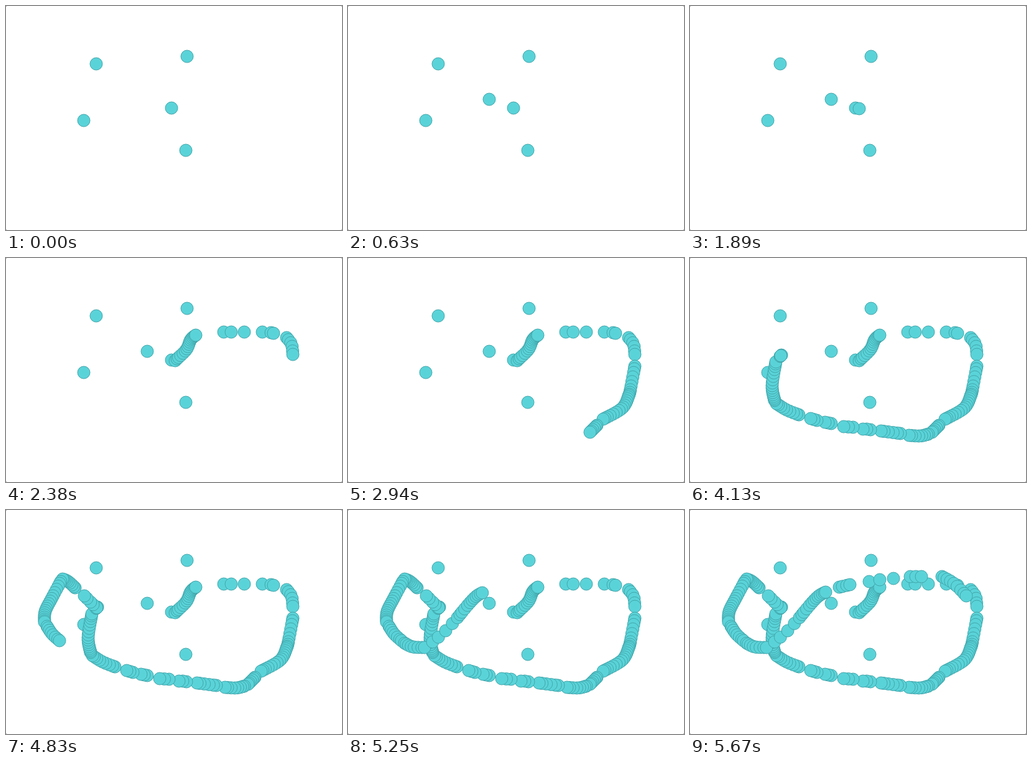
Recreate the animation shown at these times as an HTML page with a canvas. Size 540x360 px, loop 6580 ms.

```html
<!DOCTYPE html>
<html lang="en">
<head>
<meta charset="utf-8">
<title>Dotted strokes</title>
<style>
  html, body { margin: 0; width: 100%; height: 100%; overflow: hidden; background: #fff; }
  canvas { display: block; }
</style>
</head>
<body>
<canvas id="stage" width="540" height="360"></canvas>
<script>
const LOOP = 6580;
const TICK = 70;
const ctx = document.getElementById('stage').getContext('2d');
const dots = [];

function dot(time, x, y) {
  dots.push({ time, x, y });
}

function spline(a, b, c, d, t) {
  return b + t / 2 * (c - a + t * (2 * a - 5 * b + 4 * c - d + t * (3 * (b - c) + d - a)));
}

// Spreads dots along a smooth curve; closer key points mean a slower hand.
function run(count, ...keys) {
  const last = keys.length - 1;
  const key = i => keys[Math.max(0, Math.min(last, i))];
  return Array.from({ length: count }, (_, i) => {
    const u = i / Math.max(1, count - 1) * last;
    const k = Math.floor(u);
    return [0, 1].map(axis =>
      spline(key(k - 1)[axis], key(k)[axis], key(k + 1)[axis], key(k + 2)[axis], u - k));
  });
}

// Releases the dots of all runs evenly over a number of ticks.
function stroke(start, ticks, ...runs) {
  const line = runs.flat();
  line.forEach(([x, y], i) => {
    const tick = Math.ceil((i + 1) * ticks / line.length) - 1;
    dot(start + tick * TICK, x, y);
  });
}

dot(0, 145, 93);
dot(0, 125, 184);
dot(0, 291, 81);
dot(0, 266, 164);
dot(0, 289, 232);
dot(630, 227, 150);
dot(1890, 272, 165);

// Top right
stroke(1960, 9,
  run(15, [275, 162], [290, 147], [297, 131], [305, 124]),
  run(3, [350, 119], [362, 119], [383, 119]),
  run(3, [412, 119], [426, 120], [430, 121]),
  run(6, [451, 128], [459, 139], [461, 155]),
  run(8, [461, 174], [453, 216]));

// Bottom right
stroke(2590, 10,
  run(16, [452, 219], [441, 241], [410, 259]),
  run(6, [400, 269], [389, 280]),
  run(8, [383, 283], [370, 286], [352, 285]),
  run(6, [338, 282], [307, 278]),
  run(2, [290, 276], [284, 275]));

// Bottom left
stroke(3290, 10,
  run(1, [278, 275]),
  run(3, [262, 272], [247, 271]),
  run(3, [227, 266], [217, 264]),
  run(3, [204, 261], [194, 258]),
  run(9, [175, 252], [155, 244], [139, 234]),
  run(17, [136, 229], [132, 205], [138, 167]),
  run(2, [145, 158], [147, 156]));

// Tail fin
stroke(4060, 10,
  run(7, [146, 157]),
  run(4, [140, 152], [126, 138]),
  run(9, [111, 125], [100, 115], [91, 111]),
  run(18, [88, 115], [74, 141], [63, 163], [62, 180]));

// Back of the body
stroke(4760, 10,
  run(8, [66, 187], [74, 199], [86, 210]),
  run(8, [91, 214], [104, 220], [123, 221]),
  run(5, [136, 212], [157, 194], [176, 173]),
  run(12, [180, 168], [195, 150], [207, 138], [218, 132]),
  run(4, [240, 124], [257, 120]),
  run(3, [288, 115], [305, 112], [327, 110]));

stroke(5460, 4,
  run(3, [354, 107], [372, 107]),
  run(9, [405, 107], [424, 118], [444, 138]));

function draw(time) {
  ctx.fillStyle = '#fff';
  ctx.fillRect(0, 0, 540, 360);
  ctx.fillStyle = '#999';
  for (const x of [0, 539]) {
    for (const y of [0, 359]) ctx.fillRect(x, y, 1, 1);
  }
  ctx.fillStyle = '#5ad3d8';
  ctx.strokeStyle = '#41a7ac';
  ctx.lineWidth = 1;
  for (const d of dots) {
    if (d.time > time) break;
    ctx.beginPath();
    ctx.arc(d.x, d.y, 10, 0, 2 * Math.PI);
    ctx.fill();
    ctx.stroke();
  }
}

const begin = performance.now();
function frame() {
  draw((performance.now() - begin) % LOOP);
  requestAnimationFrame(frame);
}
frame();
</script>
</body>
</html>
```
